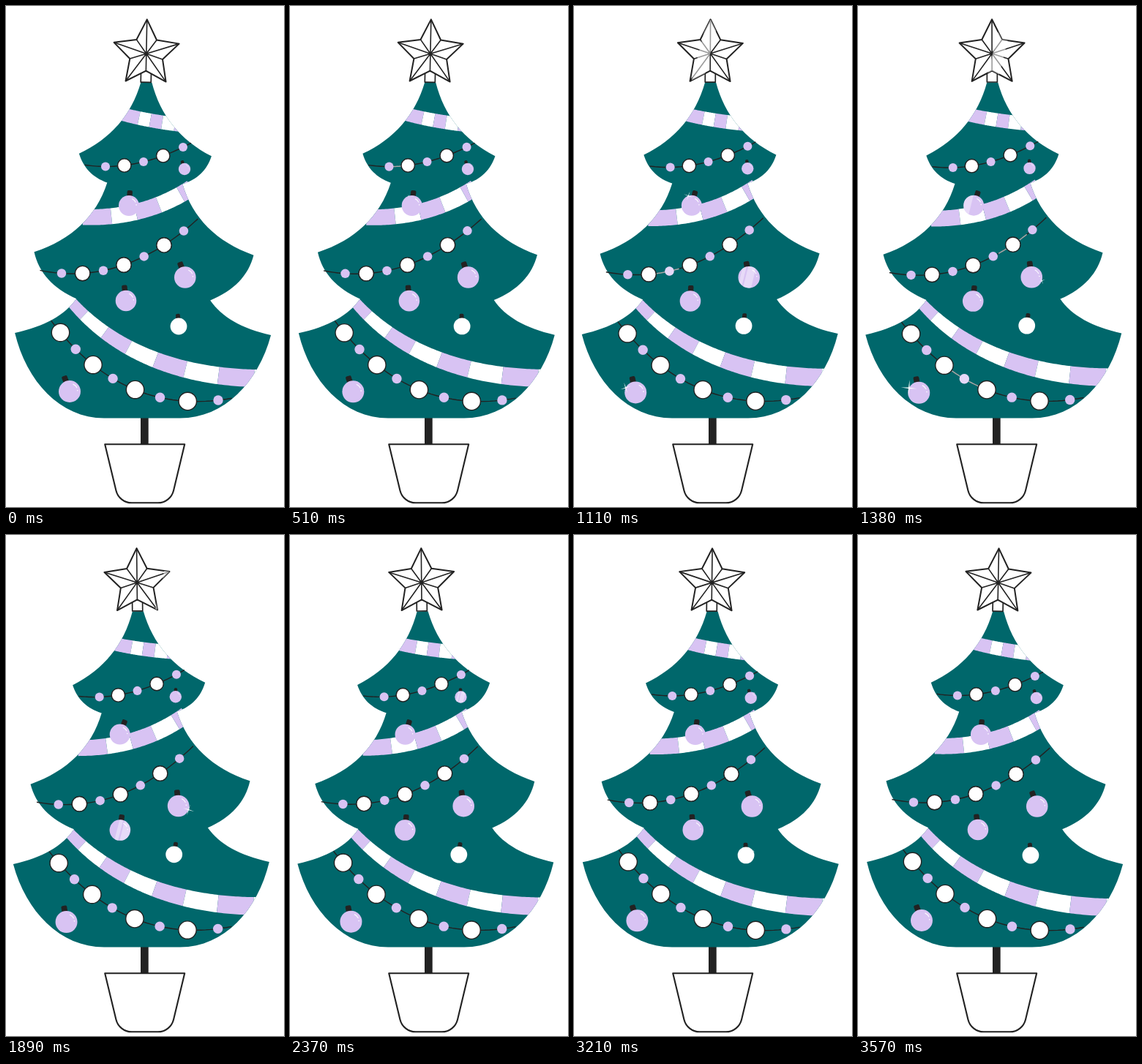
Animation, 380 px wide and 685 px high, one loop 3600 ms. Source, as an HTML page with a canvas:

```html
<!DOCTYPE html>
<html lang="en">
<head>
<meta charset="utf-8">
<title>Swaying tree</title>
<style>
  html, body { margin: 0; width: 100%; height: 100%; overflow: hidden; background: #fff; }
  canvas { display: block; width: 380px; height: 685px; }
</style>
</head>
<body>
<canvas id="stage"></canvas>
<script>
const LOOP = 3600, TAU = Math.PI * 2, AXIS = 186;
const TEAL = '#00676b', LILAC = '#d8c3f3', DARK = '#222', WHITE = '#fff';
const canvas = document.getElementById('stage');
const ctx = canvas.getContext('2d');
const dpr = window.devicePixelRatio || 1;
canvas.width = 380 * dpr;
canvas.height = 685 * dpr;

// Right half of the upright tree, measured from the axis; the left half mirrors it.
const HALF = [
  [7.5, 104.5, 26, 172, 90.5, 203.5], [90.5, 203.5, 81.5, 232.5, 51.5, 242.5],
  [51.5, 242.5, 73, 312, 150, 338.5], [150, 338.5, 140, 380.5, 91.5, 401.3],
  [91.5, 401.3, 114.5, 435, 175, 448.5], [175, 448.5, 158.5, 514, 112, 563.5, 52, 563.5]
];

// Stripes start at `first` along the curve and repeat every `step`.
const RIBBONS = [
  { mid: [156, 147, 192, 157, 239, 162.5], width: [18, 19], first: .34, step: .19 },
  { mid: [105, 288.7, 187, 291, 250, 251], width: [21.5, 22.5], first: .245, step: .222 },
  { mid: [89.5, 404.5, 141, 464.5, 225, 506.5, 340, 509], width: [14.5, 24], first: .105, step: .149 }
];

// Beads sit evenly on the curve, small and big in turn; the string overhangs both ends.
const GARLANDS = [
  { curve: [136, 219.5, 187, 219.7, 242, 193], count: 5, big: 9.2, odd: 1, ends: [-.28, 1.1], glint: 370 },
  { curve: [76, 365.5, 162.5, 371.5, 243, 307.5], count: 7, big: 10.2, odd: 1, ends: [-.17, 1.12], glint: 905 },
  { curve: [74.5, 446.5, 119.5, 500.7, 188, 550.8, 290, 539], count: 8, big: 12.2, odd: 0, ends: [-.1, 1.06], glint: 1090 }
];

// `hang` is the resting tilt, `at` the angle of the sparkle on the rim.
const BAUBLES = [
  { x: 244, y: 223, r: 8.2, hang: .29, glint: 2370, spark: 2880, at: -.95 },
  { x: 168, y: 273, r: 14, hang: -.07, glint: 1480, spark: 870, at: -1.9 },
  { x: 244.8, y: 371, r: 14.8, hang: .34, glint: 1130, spark: 1680, at: .35 },
  { x: 164, y: 403, r: 14.3, hang: .11, glint: 1850 },
  { x: 236, y: 438, r: 11.4, hang: .07, white: true, spark: 2880, at: -.5 },
  { x: 87, y: 527, r: 15, hang: .35, glint: 870, spark: 1330, at: -2.7 }
];

let now = 0;

// 0 at the loop start, about 1 at the far end of the sway.
function sway(delay) {
  const w = TAU / LOOP, rest = Math.cos(w * delay);
  return (rest - Math.cos(w * (now - delay))) / (1 + rest);
}

const height = y => Math.max(0, (563 - y) / 545);
const bend = y => sway(40 + 255 * height(y) ** 1.4);

// Bends a point laid out at sway `rest`; higher parts move further and later.
function warp([x, y], rest = 0) {
  const u = height(y), q = bend(y) - rest;
  return [x - 14.5 * u ** 1.2 * q, y - (x - AXIS) * .055 * u ** .7 * q];
}

// Point on a quadratic or cubic curve given as a flat list.
function bezier(c, t) {
  let p = [];
  for (let i = 0; i < c.length; i += 2) p.push([c[i], c[i + 1]]);
  while (p.length > 1)
    p = p.slice(1).map((b, i) => [p[i][0] + (b[0] - p[i][0]) * t, p[i][1] + (b[1] - p[i][1]) * t]);
  return p[0];
}

function sample(point, from, to, steps = 16) {
  return Array.from({ length: steps + 1 }, (_, i) => point(from + (to - from) * i / steps));
}

function trace(pts, close) {
  ctx.beginPath();
  pts.forEach(p => ctx.lineTo(p[0], p[1]));
  if (close) ctx.closePath();
}

function disc(x, y, r) {
  ctx.beginPath();
  ctx.arc(x, y, r, 0, TAU);
}

function fill(color) {
  ctx.fillStyle = color;
  ctx.fill();
}

function stroke(color, width) {
  ctx.strokeStyle = color;
  ctx.lineWidth = width;
  ctx.stroke();
}

function drawPot() {
  ctx.fillStyle = DARK;
  ctx.fillRect(184, 560, 10.7, 39);
  ctx.beginPath();
  ctx.moveTo(190, 599.3);
  ctx.lineTo(244.2, 599.3);
  ctx.arcTo(225, 679.3, 190, 679.3, 22);
  ctx.arcTo(154.5, 679.3, 135.2, 599.3, 22);
  ctx.lineTo(135.2, 599.3);
  ctx.closePath();
  fill(WHITE);
  stroke(DARK, 2.1);
}

function treePath() {
  const half = HALF.flatMap(c => sample(t => bezier(c, t), 0, 1));
  const right = half.map(([x, y]) => [AXIS + x, y]);
  const left = half.map(([x, y]) => [AXIS - x, y]).reverse();
  trace([...right, ...left].map(p => warp(p, .5)), true);
}

function drawRibbon({ mid, width: [thin, wide], first, step }) {
  const edge = side => t => {
    const [x, y] = bezier(mid, t), [x2, y2] = bezier(mid, t + .01);
    const d = Math.hypot(x2 - x, y2 - y);
    const w = side * (thin + (wide - thin) * Math.sin(t * TAU / 4)) / 2;
    return [x - (y2 - y) / d * w, y + (x2 - x) / d * w];
  };
  let from = 0;
  for (let i = 0; from < 1; i++) {
    const to = Math.min(1.03, first + i * step);
    trace([...sample(edge(-1), from, to), ...sample(edge(1), to, from)].map(p => warp(p)), true);
    fill(i % 2 ? WHITE : LILAC);
    from = to;
  }
}

function drawGarland({ curve, count, big, odd, ends, glint }) {
  const point = t => warp(bezier(curve, t));
  const head = (now - glint) / 500, tail = head - .24;
  trace(sample(point, ...ends, 50));
  stroke(DARK, 1.4);
  if (head > 0 && tail < 1) {
    trace(sample(point, Math.max(0, tail), Math.min(1, head)));
    stroke('rgba(255,255,255,.6)', 1.5);
  }
  for (let i = 0; i < count; i++) {
    const t = i / (count - 1), isBig = i % 2 === odd;
    disc(...point(t), isBig ? big : 4 + big * .22);
    fill(isBig ? WHITE : LILAC);
    if (isBig) stroke(DARK, 1.4);
    else if (t > tail && t < head) fill('rgba(255,255,255,.35)');
  }
}

// Slanted pale band crossing the current clip.
function band(x, w, h, alpha) {
  const lean = h * .25;
  trace([[x + lean, -h], [x + w + lean, -h], [x + w - lean, h], [x - lean, h]], true);
  fill(`rgba(255,255,255,${alpha})`);
}

function starPoints(count, outer, inner) {
  return Array.from({ length: count * 2 }, (_, i) => {
    const r = i % 2 ? inner : outer, a = i * Math.PI / count - TAU / 4;
    return [r * Math.cos(a), r * Math.sin(a)];
  });
}

function drawBauble({ x, y, r, hang, white, glint, spark, at }) {
  const len = r + 4;
  const [px, py] = warp([x - len * Math.sin(hang), y - len * Math.cos(hang)]);
  const angle = hang - (.18 + .2 * height(y)) * sway(55);

  ctx.save();
  ctx.translate(px + len * Math.sin(angle), py + len * Math.cos(angle));
  ctx.save();
  ctx.rotate(-angle);
  const w = Math.max(4.5, r * .52), h = Math.max(4, r * .5);
  ctx.beginPath();
  ctx.roundRect(-w / 2, -r - h, w, h + 3, [2, 2, 0, 0]);
  fill(DARK);
  ctx.restore();

  disc(0, 0, r);
  fill(white ? WHITE : LILAC);
  if (!white) {
    const sweep = (now - glint) / 250;
    if (Math.abs(sweep) < 1) {
      ctx.save();
      ctx.clip();
      band((sweep * 2.2 - .65) * r, r * .35, r, .38);
      band((sweep * 2.2 - .15) * r, r * .75, r, .38);
      ctx.restore();
    }
    ctx.beginPath();
    ctx.arc(0, 0, r * .74, -1.15, -.45);
    stroke('rgba(255,255,255,.9)', r * .08);
    disc(r * .72, -r * .08, r * .055);
    fill(WHITE);
  }
  const age = (now - spark) / 420;
  if (Math.abs(age) < 1) {
    const size = r * .75 * Math.cos(age * TAU / 4);
    ctx.translate(r * Math.cos(at), r * Math.sin(at));
    ctx.rotate(age * .6);
    trace(starPoints(4, size, size * .1), true);
    fill(WHITE);
  }
  ctx.restore();
}

function drawStar() {
  const pts = starPoints(5, 46.8, 23.5);
  ctx.save();
  ctx.translate(...warp([191.8, 65.2]));
  ctx.rotate(.02 - .032 * bend(66));
  ctx.beginPath();
  ctx.rect(-6.8, 24, 14, 15);
  fill(WHITE);
  stroke(DARK, 1.7);
  trace(pts, true);
  fill(WHITE);
  stroke(DARK, 2);
  ctx.beginPath();
  for (const p of pts) {
    ctx.moveTo(0, 0);
    ctx.lineTo(...p);
  }
  stroke(DARK, 1.6);
  const sweep = (now - 1050) / 1100;
  if (sweep > 0 && sweep < 1) {
    trace(pts, true);
    ctx.clip();
    band(-20 + sweep * 70, 16, 48, .55);
  }
  ctx.restore();
}

function draw(time) {
  now = time % LOOP;
  ctx.setTransform(dpr, 0, 0, dpr, 0, 0);
  ctx.lineJoin = 'round';
  ctx.fillStyle = WHITE;
  ctx.fillRect(0, 0, 380, 685);
  drawPot();
  ctx.save();
  treePath();
  fill(TEAL);
  ctx.clip();
  RIBBONS.forEach(drawRibbon);
  ctx.restore();
  GARLANDS.forEach(drawGarland);
  BAUBLES.forEach(drawBauble);
  drawStar();
}

const start = performance.now();
function tick() {
  draw(performance.now() - start);
  requestAnimationFrame(tick);
}
tick();
</script>
</body>
</html>
```
